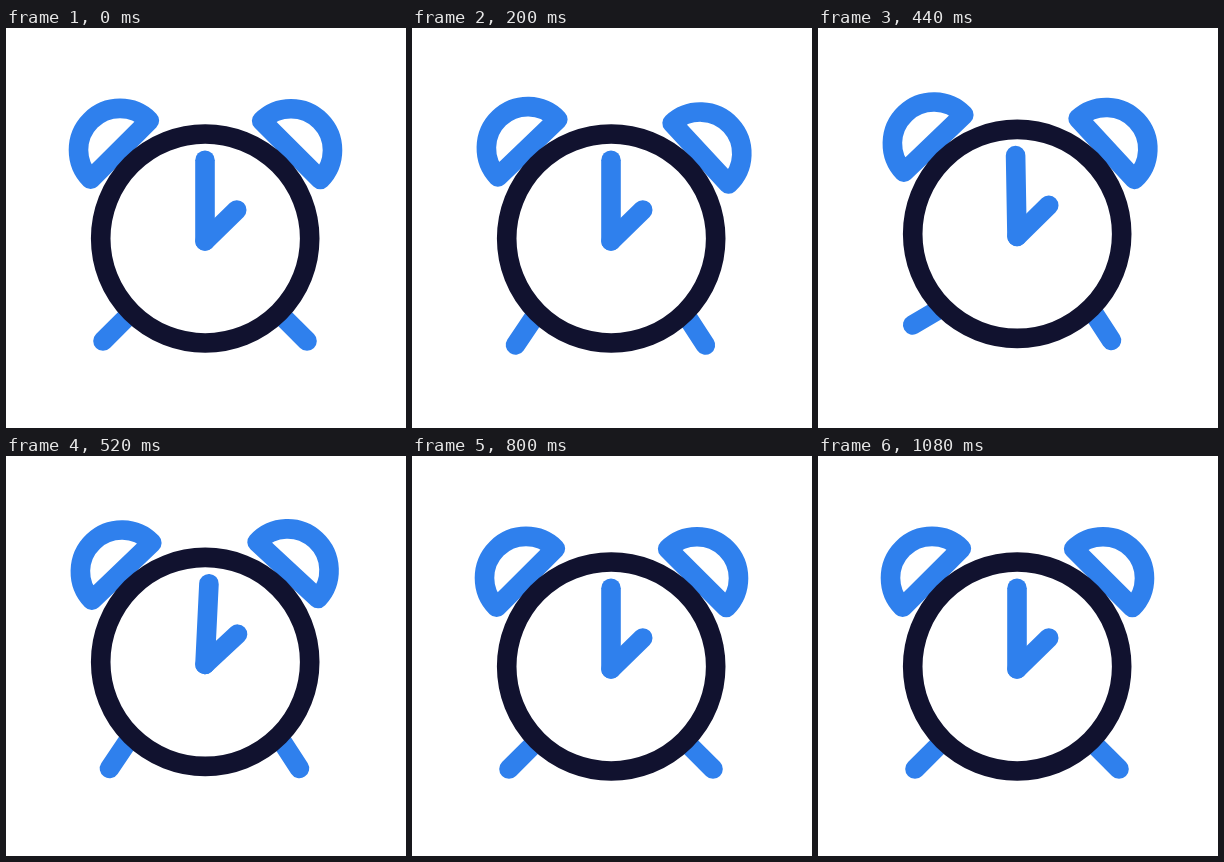
Write an HTML page with a canvas that moves like this. It is 400 px wide and 400 px high and loops after 1.16 s.

```html
<!DOCTYPE html>
<html lang="en">
<head>
<meta charset="utf-8">
<title>Alarm clock</title>
<style>
html, body { margin: 0; width: 100%; height: 100%; overflow: hidden; background: #fff; }
canvas { display: block; width: 400px; height: 400px; }
</style>
</head>
<body>
<canvas id="stage" width="400" height="400"></canvas>
<script>
const ctx = document.getElementById('stage').getContext('2d');
const BLUE = '#2f80ed', NAVY = '#11122f';
const STEP = 40, LOOP = 1160, LAST = 27;
const CX = 199.2, CY = 210.5;
const rad = deg => deg * Math.PI / 180;

// Each part shakes on its own cycle, one entry per step
const cycles = {
  lift: [0, 1, 0, 1, 0],
  leftBell: [0, 0, -2.2, 1.2, 0, 1.2, -2.2, 0],
  rightBell: [0, 1, 0, -1, 0, 1, -1, 1, 1, -1],
  minute: [0, -1, -1, 2.8, 1.4],
  hour: [0, 1.5, 0, 0, 1.5, 0],
  leftLeg: [0, 1, 0, 2],
  rightLeg: [0, 1]
};

// Foot position and direction of the leg, in degrees
const leftLegs = [[97, 313, -45], [103.5, 317, -56], [94.7, 301.5, -30.5]];
const rightLegs = [[301, 313, -135], [293.4, 317, -123]];

function line(x, y, deg, len) {
  ctx.beginPath();
  ctx.moveTo(x, y);
  ctx.lineTo(x + len * Math.cos(rad(deg)), y + len * Math.sin(rad(deg)));
  ctx.stroke();
}

function bell(x, y, facing, turn) {
  ctx.save();
  ctx.translate(CX, CY);
  ctx.rotate(rad(turn));
  ctx.translate(x - CX, y - CY);
  ctx.rotate(rad(facing));
  ctx.beginPath();
  ctx.arc(0, 0, 41.5, Math.PI, 0);
  ctx.closePath();
  ctx.stroke();
  ctx.restore();
}

function draw(time) {
  const step = Math.min(LAST, Math.floor((time % LOOP) / STEP)) % LAST;
  const pose = name => cycles[name][step % cycles[name].length];

  ctx.fillStyle = '#fff';
  ctx.fillRect(0, 0, 400, 400);
  ctx.save();
  ctx.translate(0, -4.6 * pose('lift'));
  ctx.lineWidth = 19.6;
  ctx.lineCap = ctx.lineJoin = 'round';

  ctx.strokeStyle = BLUE;
  line(...leftLegs[pose('leftLeg')], 37);
  line(...rightLegs[pose('rightLeg')], 37);
  bell(114, 121.9, -45, pose('leftBell'));
  bell(285, 122.2, 45, 2.2 * pose('rightBell'));

  ctx.strokeStyle = NAVY;
  ctx.beginPath();
  ctx.arc(CX, CY, 104.5, 0, 2 * Math.PI);
  ctx.fill();
  ctx.stroke();

  ctx.strokeStyle = BLUE;
  line(199, 213, -90 + pose('minute'), 80.8);
  line(199, 213, -44.4 + pose('hour'), 44.4);
  ctx.restore();
}

const start = performance.now();
function tick() {
  draw(performance.now() - start);
  requestAnimationFrame(tick);
}
tick();
</script>
</body>
</html>
```
